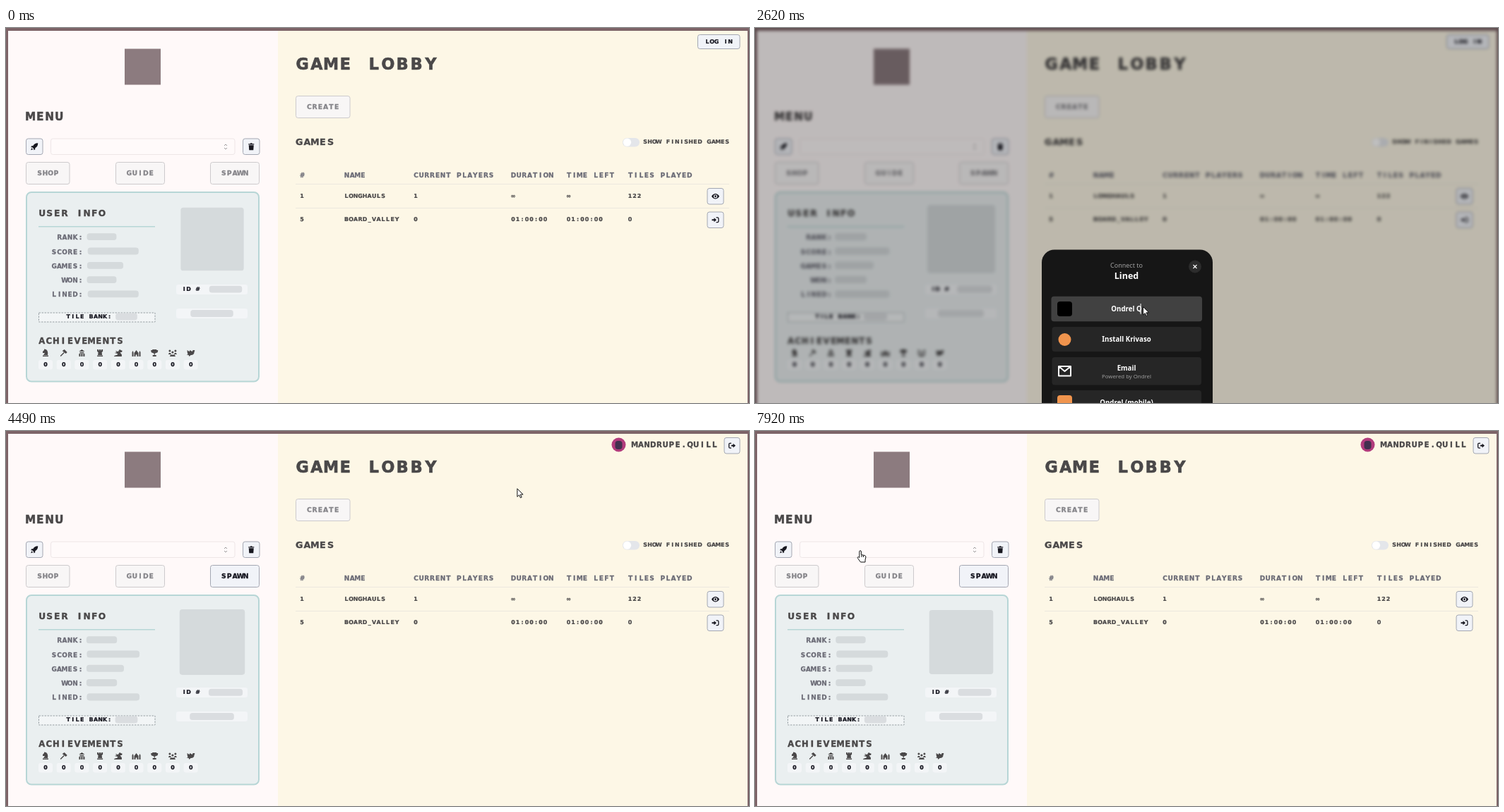
An HTML page for the animation above (7.99 s loop, 1052 by 532 pixels).

```html
<!DOCTYPE html>
<html lang="en">
<head>
<meta charset="utf-8">
<title>Game lobby</title>
<style>
  html, body { margin: 0; width: 100%; height: 100%; overflow: hidden; background: #7d6468; }
  svg { display: block; width: 100%; height: 100%; }
  .mono { font-family: "DejaVu Sans", sans-serif; font-weight: 700; text-anchor: middle; stroke-width: .03em; }
  .ui { font-family: "Noto Sans", "Open Sans", sans-serif; text-anchor: middle; }
  .pulse, .hover { transform-box: fill-box; transform-origin: center; }
  .pulse { transform: scale(var(--pulse)); }
</style>
</head>
<body>
<svg id="stage" viewBox="0 0 1052 532"></svg>
<script>
const stage = document.getElementById('stage');

function add(parent, tag, attrs = {}, text) {
  const node = document.createElementNS('http://www.w3.org/2000/svg', tag);
  for (const key in attrs) node.setAttribute(key, attrs[key]);
  if (text) node.textContent = text;
  parent.append(node);
  return node;
}
const group = (parent, attrs) => add(parent, 'g', attrs);
const box = (parent, x, y, width, height, fill, rx = 0, more = {}) =>
  add(parent, 'rect', { x, y, width, height, fill, rx, ...more });
const disc = (parent, cx, cy, r, fill) => add(parent, 'circle', { cx, cy, r, fill });
const icon = (parent, d, x, y, fill = '#17171f') =>
  add(parent, 'path', { d, fill, 'fill-rule': 'evenodd', transform: `translate(${x} ${y})` });

// Wide fixed-pitch lettering: every glyph is centred in its own cell.
function mono(parent, text, x, y, pitch, fill) {
  const size = pitch * 1.04 + 1.2;
  const xs = [...text].map((c, i) => (x + (i + .48) * pitch).toFixed(2)).join(' ');
  return add(parent, 'text', { class: 'mono', x: xs, y: y + size * .365, 'font-size': size, fill, stroke: fill }, text);
}
const ui = (parent, text, y, size, fill, weight = 400) =>
  add(parent, 'text', { class: 'ui', x: 526, y, 'font-size': size, fill, 'font-weight': weight }, text);

const INK = '#4a4849', SOFT = '#6b6b76', DARK = '#15151f', TEAL = '#b7d6d6';

function button(parent, x, y, w, h, { label, pitch = 7.8, d, on = true }) {
  const g = group(parent, { class: 'hover' });
  box(g, x + .5, y + .5, w - 1, h - 1, on ? '#f1f3f8' : '#f8f6f6', 3, { stroke: on ? '#a3a7b2' : '#cccacc' });
  if (label) mono(g, label, x + w / 2 - label.length * pitch / 2 + .2, y + h / 2 - .5, pitch, on ? DARK : '#858489');
  if (d) icon(g, d, x + w / 2, y + h / 2);
  return g;
}

const ICONS = {
  rocket: 'M5-5c-4 0-6 2-7 4h-2l-1 2h2l2 2v2l2-1v-2c2-1 4-3 4-7zM-5 5l1-3 2 2z',
  trash: 'M-4-4h2.5l.5-1h2l.5 1h2.5v1.2h-8zM-3.5-2h7l-.5 7h-6z',
  eye: 'M-5.5 0c3-5 8-5 11 0c-3 5-8 5-11 0zM-2.6 0a2.6 2.6 0 1 0 5.2 0a2.6 2.6 0 1 0-5.2 0zM-1.4 0a1.4 1.4 0 1 0 2.8 0a1.4 1.4 0 1 0-2.8 0z',
  enter: 'M-5-1h3v-2l3.5 3-3.5 3v-2h-3zM1-4h2q2 0 2 2v4q0 2-2 2h-2v-1.3h2q.7 0 .7-.7v-4q0-.7-.7-.7h-2z',
  leave: 'M-1-1h2.5v-2l3.5 3-3.5 3v-2h-2.5zM-1-4h-2q-2 0-2 2v4q0 2 2 2h2v-1.3h-2q-.7 0-.7-.7v-4q0-.7.7-.7h2z'
};
const AWARDS = [
  'M-4 3.5h8v1.5h-8zM-3 3l2-3h-3v-2l2-2v-1.5c4 0 6 3 5 8.500z',
  'M-5 4l5-5 1 1-5 5zM-2-3l3-2 4 4-2 2z',
  'M-4-2l4-3 4 3zM-3-1h6v1.500h-6zM-4 5v-4h2v4zM-1 5v-4h2v4zM2 5v-4h2v4z',
  'M-4-5h2v1.500h1v-1.500h2v1.500h1v-1.500h2v3l-1.500 1 .5 4h-6l.5-4-1.500-1zM-4 3.500h8v1.500h-8z',
  'M-6 5c2-3 6-1 5-4l-4-1 3-1-2-2 4 1 2-3 4 2-1 2h-2c0 2 3 2 2 6z',
  'M-6 5v-6l1-2 1 2v6zM4 5v-6l1-2 1 2v6zM-3 5v-5l3-4 3 4v5h-2v-2l-1-1-1 1v2z',
  'M-3-5h6v1h2c0 3-1 4-3 4l-1.500 1v2h2v2h-5v-2h2v-2l-1.500-1c-2 0-3-1-3-4h2z',
  'M-5.500-3a1.500 1.500 0 1 0 3 0a1.500 1.500 0 1 0-3 0zM2.500-3a1.500 1.500 0 1 0 3 0a1.500 1.500 0 1 0-3 0zM-1.600-1a1.600 1.600 0 1 0 3.200 0a1.600 1.600 0 1 0-3.200 0zM-6 2l1-2h2l1 2zM6 2l-1-2h-2l-1 2zM-4 5l1-2.500h6l1 2.500z',
  'M-5-4l3 2 1-2 3 2 1-2h2l1 1-1 1c0 4-2 5-5 5l-2 2-1-2h-3l2-1c-1-2-1-4-1-6z'
];

// Page
const page = group(stage);
box(page, -20, -20, 1092, 572, '#7d6468');
box(page, 3, 4, 382, 560, '#fff9f9');
box(page, 385, 4, 665, 560, '#fdf7e6');

box(page, 168, 29.5, 51, 51, '#8c7b7f');
mono(page, 'MENU', 28, 125, 13.6, INK);
button(page, 28, 156.5, 24.500, 23.500, { d: ICONS.rocket });
box(page, 63.500, 157, 260.500, 22.500, '#fffafa', 3, { stroke: '#eee6e7' });
add(page, 'path', { d: 'M309 167l2-2 2 2M309 170l2 2 2-2', fill: 'none', stroke: '#9b9799' });
button(page, 335, 156.500, 24.500, 23.500, { d: ICONS.trash });
button(page, 28, 190, 62.500, 32, { label: 'SHOP', on: false });
button(page, 155, 190, 70, 32, { label: 'GUIDE', on: false });
const spawnOff = button(page, 289, 190, 70, 32, { label: 'SPAWN', on: false });
const spawnOn = button(page, 289, 190, 70, 32, { label: 'SPAWN' });

// User card
box(page, 29, 233, 329, 268.500, '#eaeff0', 7, { stroke: TEAL, 'stroke-width': 2 });
mono(page, 'USER INFO', 46, 263, 10.600, INK);
box(page, 46, 281, 165, 1.500, TEAL);
const pulse = (cx, cy, w, h, fill = '#d5dadc', rx = 4) =>
  box(page, cx - w / 2, cy - h / 2, w, h, fill, rx, { class: 'pulse' });
[['RANK:', 45], ['SCORE:', 77.500], ['GAMES:', 55], ['WON:', 45], ['LINED:', 77.500]].forEach(([label, w], i) => {
  const y = 296.500 + i * 20.300;
  mono(page, label, 109.500 - label.length * 7.500, y + .5, 7.500, SOFT);
  pulse(113 + w / 2, y - .3, w, 10.500);
});
pulse(292, 299.500, 96, 96.500);
box(page, 46.500, 404, 164.500, 13, '#f2f5f6', 0, { stroke: '#98a0a4', 'stroke-dasharray': '2.500 1.500' });
mono(page, 'TILE BANK:', 85, 409.500, 6.500, DARK);
pulse(170.500, 409.500, 33, 10.500, '#dadde0');
box(page, 241, 364, 101, 14, '#f3f5f7', 3);
mono(page, 'ID #', 249, 370.500, 6.500, DARK);
pulse(311, 370.700, 50, 10.500, '#dadde0');
box(page, 241, 398, 101, 14, '#f3f5f7', 3);
pulse(291.500, 405, 65, 10.500, '#dadde0');
mono(page, 'ACHIEVEMENTS', 46, 443.500, 10.050, INK);
AWARDS.forEach((d, i) => {
  const x = 56 + i * 25.700;
  icon(page, d, x, 461, INK);
  box(page, x - 10, 471, 20, 13.500, '#f3f5f7', 3);
  mono(page, '0', x - 3, 477.500, 6.500, DARK);
});

// Lobby
mono(page, 'GAME LOBBY', 410, 51, 20.200, INK);
button(page, 410, 96, 77.500, 32, { label: 'CREATE', on: false });
mono(page, 'GAMES', 410, 161.500, 11.050, INK);
box(page, 873, 156, 24, 12.500, '#e4e6ea', 6.250);
disc(page, 879.500, 162.200, 5.600, '#fff');
mono(page, 'SHOW FINISHED GAMES', 902, 161, 6.450, INK);

const COLUMNS = [416, 479, 577, 715, 793.500, 880.500];
function row(cells, y, pitch, fill) {
  cells.forEach((cell, i) => mono(page, cell, COLUMNS[i], y, pitch, fill));
}
row(['#', 'NAME', 'CURRENT PLAYERS', 'DURATION', 'TIME LEFT', 'TILES PLAYED'], 209, 7.600, SOFT);
row(['1', 'LONGHAULS', '1', '∞', '∞', '122'], 238.500, 6.500, INK);
row(['5', 'BOARD_VALLEY', '0', '01:00:00', '01:00:00', '0'], 271.500, 6.500, INK);
box(page, 410, 221, 614, 1, '#ece8de');
box(page, 410, 255, 614, 1, '#ece8de');
button(page, 992.500, 227, 24, 23.500, { d: ICONS.eye });
button(page, 992.500, 260.500, 24, 23.500, { d: ICONS.enter });

const login = button(page, 979, 9, 60.500, 21, { label: 'LOG IN', pitch: 6.500 });
const logout = button(page, 1016.500, 9, 23, 23.500, { d: ICONS.leave });
const user = group(page);
disc(user, 867.500, 19.500, 10, '#b23c7c');
box(user, 862.500, 14, 10, 12, '#43304f', 4);
mono(user, 'MANDRUPE.QUILL', 886, 19.500, 8.700, INK);

// Connect dialog
const dialog = group(stage);
box(dialog, 0, 0, 1052, 532, 'rgba(0,0,0,.255)');
box(dialog, 406, 314.500, 242, 250, '#161616', 18);
ui(dialog, 'Connect to', 340, 9, '#a0a0a0');
ui(dialog, 'Lined', 356, 12.500, '#fff', 600);
disc(dialog, 623, 338.500, 9, '#2c2c2c');
add(dialog, 'path', { d: 'M620.500 336l5 5m0-5l-5 5', stroke: '#fff', 'stroke-width': 1.100 });
const choice = box(dialog, 420.500, 381, 211.500, 35, '#262626', 4);
box(dialog, 420.500, 424, 211.500, 35, '#262626', 4);
box(dialog, 420.500, 467, 211.500, 39.500, '#262626', 4);
box(dialog, 420.500, 514, 211.500, 35, '#262626', 4);
box(dialog, 428, 388, 21, 21, '#000', 4);
disc(dialog, 438.500, 442, 9, '#f0944d');
add(dialog, 'path', { d: 'M430 480h17v13.500h-17zl8.500 7 8.500-7', fill: 'none', stroke: '#fff', 'stroke-width': 2, 'stroke-linejoin': 'round' });
box(dialog, 428, 521, 21, 21, '#f0944d', 4);
ui(dialog, 'Ondrel Q', 402, 9.700, '#fff', 600);
ui(dialog, 'Install Krivaso', 445, 9.700, '#fff', 600);
ui(dialog, 'Email', 486, 9.700, '#fff', 600);
ui(dialog, 'Powered by Ondrel', 496.500, 7.800, '#9c9c9c');
ui(dialog, 'Ondrel (mobile)', 535, 9.700, '#fff', 600);
const beam = box(dialog, 545.500, 391, 1.200, 15, '#e0e0e0');

// Pointer
const pointer = group(stage, { fill: '#fff', stroke: '#111', 'stroke-linejoin': 'round' });
const arrow = add(pointer, 'path', { d: 'M.5.5v11.500l2.700-2.500 1.800 4 1.800-.8-1.800-3.900h3.700z' });
const hand = add(pointer, 'path', { d: 'M-1.200 1c0-1.700 2.600-1.700 2.600 0v4.500l4.600 1c1.500.4 1.900 1 1.900 2.500l-.9 4v3h-6.500l-4-5.500c-1-1.800.8-2.600 2.300-.8zM2 6v3M4.500 6.700v2.300' });

const PATH = [
  [200, 640, 493], [970, 1003, 14], [1180, 1003, 14], [1380, 1005, 20], [1650, 1005, 20],
  [1800, 940, 135], [2050, 750, 340], [2150, 690, 380], [2340, 549, 395], [2680, 549, 395],
  [3240, 750, 256], [3860, 999, 40], [4070, 999, 40], [4490, 724, 81], [4840, 512, 176],
  [5680, 188, 238], [5750, 184, 217], [5960, 161, 217], [6170, 161, 217], [6660, 44, 171],
  [6940, 2, 138], [7080, 2, 138], [7290, 150, 163], [7500, 150, 163], [7920, 149, 170]
];
const PULSE = [
  [200, .93], [970, .945], [1380, .99], [1510, 1], [2680, 1], [3240, .963],
  [4910, .963], [5680, .97], [6940, .975], [7500, .975], [7920, .943]
];

// Values of a [time, ...values] track at time t.
function at(track, t) {
  const i = track.findIndex(key => key[0] > t);
  if (i < 1) return (i ? track[track.length - 1] : track[0]).slice(1);
  const a = track[i - 1], b = track[i], k = (t - a[0]) / (b[0] - a[0]);
  return a.slice(1).map((v, j) => v + (b[j + 1] - v) * k);
}
const within = (t, from, to) => t >= from && t < to;
const show = (node, on) => node.setAttribute('display', on ? 'inline' : 'none');

function draw(t) {
  const open = within(t, 1380, 2680), chosen = within(t, 2270, 2680);
  page.style.filter = open ? 'blur(2px)' : 'none';
  stage.style.setProperty('--pulse', at(PULSE, t)[0]);
  show(dialog, open);
  show(beam, chosen);
  choice.setAttribute('fill', chosen ? '#414141' : '#262626');
  choice.setAttribute('transform', chosen ? 'translate(-5.260 -3.985) scale(1.010)' : '');

  const signedIn = t >= 2960;
  show(login, !signedIn);
  show(logout, signedIn);
  show(spawnOff, !signedIn);
  show(spawnOn, signedIn);
  show(user, t >= 3380);
  const grow = within(t, 1040, 1180) ? 1.020 : within(t, 940, 1510) ? 1.070 : 1;
  login.style.transform = `scale(${grow})`;

  const [x, y] = at(PATH, t);
  const pointing = within(t, 950, 1380) || within(t, 6600, 6780) || t >= 7250;
  pointer.setAttribute('transform', `translate(${x} ${y})`);
  show(pointer, t >= 200);
  show(hand, pointing);
  show(arrow, !pointing);
}

const start = performance.now();
function tick() {
  draw((performance.now() - start) % 7990);
  requestAnimationFrame(tick);
}
tick();
</script>
</body>
</html>
```
